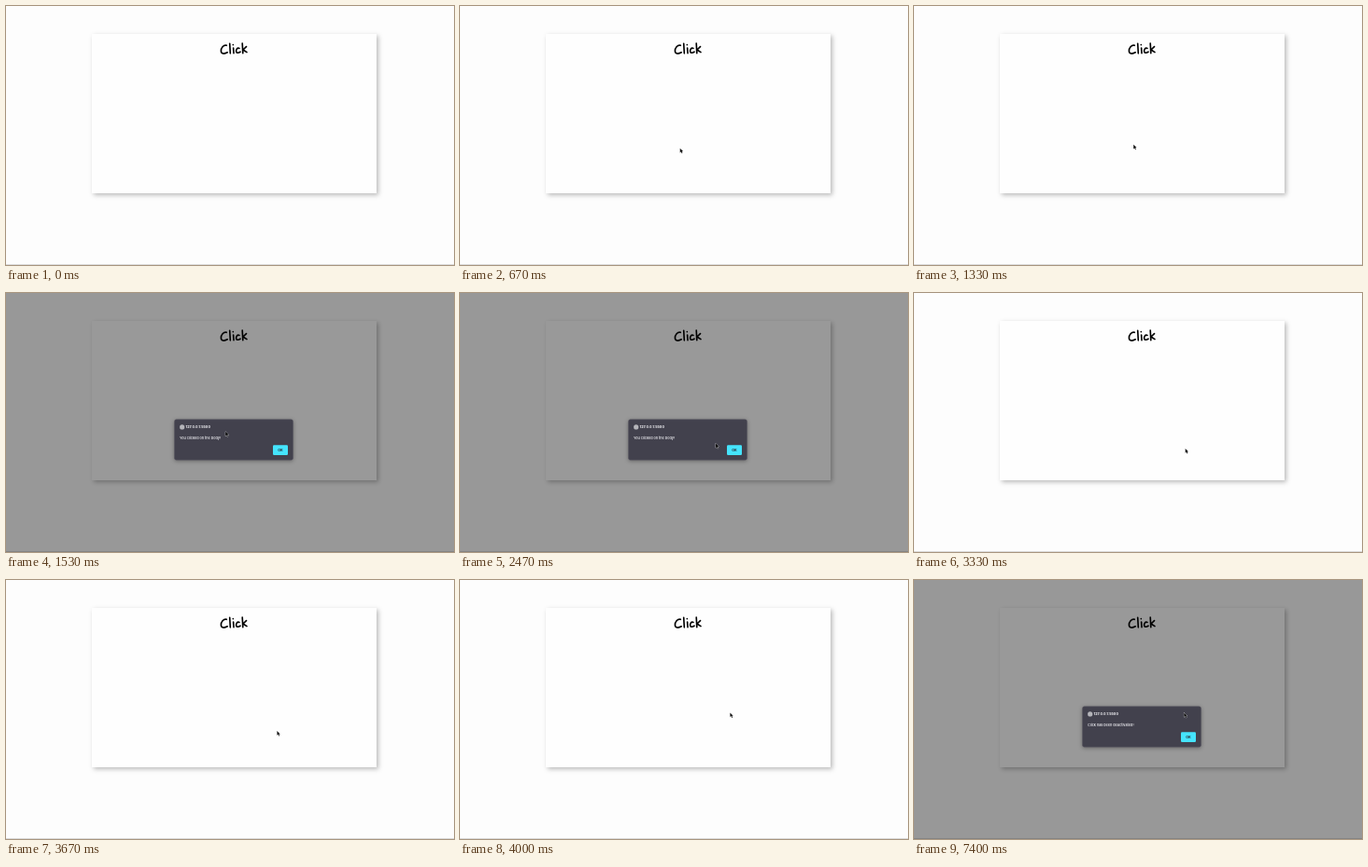
Recreate the animation shown at these times as an HTML page. Size 480 px wide and 278 px high, loop 8000 ms.

```html
<!DOCTYPE html>
<html lang="en">
<meta charset="utf-8">
<title>Click</title>
<style>
  html, body { margin: 0; width: 100%; height: 100%; overflow: hidden; background: #fdfdfd; }
  svg { display: block; width: 480px; height: 278px; }
  text { font: 500 3.75px Inter, sans-serif; fill: #fbfbfe; }
  .bold { font-weight: 700; }
  .card { fill: #fefefe; filter: drop-shadow(2px 2px 2.5px #0004); }
  .title { fill: none; stroke: #000; stroke-width: 1.65; stroke-linecap: round; stroke-linejoin: round; }
  .panel { fill: #42414d; stroke: #54535e; stroke-width: .5; filter: drop-shadow(0 1px 2px #0005); }
</style>
<svg viewBox="0 0 480 278">
  <rect width="480" height="278" fill="#fdfdfd"/>
  <rect y="277" width="480" height="1" fill="#dcdcdc"/>
  <rect class="card" x="92" y="30" width="305" height="171"/>
  <path class="title" d="M236.3 42.3C233 41.6 230.3 45 230.4 48.3C230.6 51.8 234.3 51.6 237.2 49.8
    M239.7 40.3L240.3 50.8M243.6 45L244 50.6M243.3 41.6v.1
    M250 45.4C247.8 44.3 246.3 46.8 246.7 49C247.2 51 249.4 50.3 251 49.2
    M253.2 40L253.8 50.6M257.5 43.6L254 47L258 49.6"/>
  <g id="alert">
    <rect width="480" height="278" fill="#000" opacity=".4"/>
    <rect class="panel" x="180.5" y="135.8" width="127" height="43.4" rx="2"/>
    <circle cx="188.7" cy="143.9" r="2.6" fill="#b5b5ba"/>
    <text class="bold" x="192.6" y="145.3">127.0.0.1:5500</text>
    <text id="message" x="186" y="156.8"></text>
    <rect id="button" x="286" y="163.2" width="16" height="10.8" rx="1.2"/>
    <text class="bold" x="294" y="170" text-anchor="middle" style="fill:#2b2a33">OK</text>
  </g>
  <path id="cursor" d="M0 0V4.7L1.1 3.7L1.9 5.5L2.7 5.1L1.9 3.4L3.3 3.3Z"
    fill="#111" stroke="#fff" stroke-width=".5" stroke-linejoin="round" paint-order="stroke"/>
</svg>
<script>
  const LOOP = 8000;
  const $ = id => document.getElementById(id);
  const easeOut = p => 1 - (1 - p) ** 2;
  const easeInOut = p => p * p * (3 - 2 * p);

  // Cursor moves: first step, last step, number of steps, destination, easing
  const start = [471.8, 196.8];
  const moves = [
    [200, 470, 5, [236.3, 155.8], easeOut],
    [670, 930, 4, [235, 148.8], easeOut],
    [1330, 1330, 1, [235.2, 148.8], easeOut],
    [2070, 2730, 11, [290.7, 167], easeInOut],
    [3600, 4000, 7, [289.4, 142.4], easeInOut]
  ];

  function cursorAt(t) {
    let pos = start;
    for (const [from, to, steps, end, ease] of moves) {
      if (t < from) break;
      const gap = (to - from) / (steps - 1) || 1;
      const done = Math.min(steps, Math.floor((t - from) / gap + 0.001) + 1);
      const p = ease(done / steps);
      pos = pos.map((v, i) => v + (end[i] - v) * p);
    }
    return pos;
  }

  function draw(now) {
    const t = now % LOOP;
    const [x, y] = cursorAt(t);
    const hover = x > 286 && x < 302 && y > 163 && y < 174;
    const second = t >= 7400;

    $("cursor").setAttribute("transform", `translate(${x} ${y})`);
    $("cursor").style.display = t < 200 ? "none" : "";
    $("alert").style.display = second || (t >= 1530 && t < 3330) ? "" : "none";
    $("message").textContent = second ? "Click has been deactivated!" : "You clicked on the body!";
    $("button").setAttribute("fill", !hover ? "#45e4fd" : t < 3270 ? "#80ebff" : "#9df1ff");
  }

  const begin = performance.now();
  function frame() {
    draw(performance.now() - begin);
    requestAnimationFrame(frame);
  }
  frame();
</script>
</html>
```
